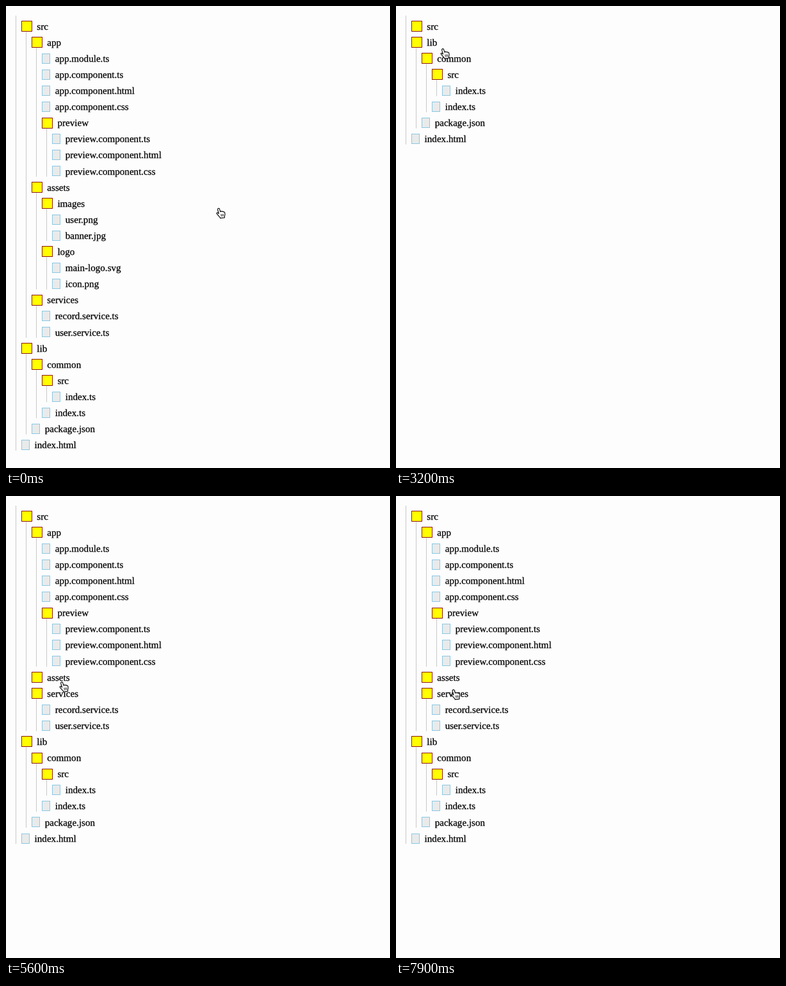
These frames come from a looping animation (600x720 px, 8000 ms). An HTML page:

```html
<!DOCTYPE html>
<html lang="en">
<head>
<meta charset="utf-8">
<title>File tree</title>
<style>
  html, body { margin: 0; width: 100%; height: 100%; overflow: hidden; background: #fefdfe; }
  svg { display: block; width: 600px; height: 720px; }
  text {
    font: 15.12px "Liberation Serif", Times, serif; text-rendering: geometricPrecision;
    stroke: #000; stroke-width: .25;
  }
  .folder { fill: #ff0; stroke: #8f1a10; }
  .file { fill: #e9eaea; stroke: #8cc8e2; }
  .guide { stroke: #c9c9c9; }
</style>
</head>
<body>
<svg viewBox="0 0 600 720">
  <g id="tree"></g>
  <g id="hand" stroke="#111" stroke-linejoin="round" stroke-linecap="round">
    <path fill="#fff" stroke-width="1.2" d="M3.5 1C5 .4 5.5 1.3 5.8 2.4L7 6.2Q8 4.5 9.5 6Q11 5 11.8 6.4Q13.4 6 13.8 7.5Q14.6 10.5 13.5 13V15.3L6.8 16.2L6.3 14.8Q3.5 12 1.2 8.8Q1 7 3 7.8L4.5 9L2.7 3Q2.4 1.5 3.5 1Z"/>
    <path fill="none" stroke-width=".8" d="M7.8 10.2l.6 3M9.6 10l.5 3M11.4 9.8l.4 3"/>
  </g>
</svg>
<script>
const LOOP = 8000, STEP = 100, ROW = 25.1, INDENT = 16.05;

const rows = `src
 app
  app.module.ts
  app.component.ts
  app.component.html
  app.component.css
  preview
   preview.component.ts
   preview.component.html
   preview.component.css
 assets
  images
   user.png
   banner.jpg
  logo
   main-logo.svg
   icon.png
 services
  record.service.ts
  user.service.ts
lib
 common
  src
   index.ts
  index.ts
 package.json
index.html`.split("\n").map(line => {
  const name = line.trim();
  return { name, depth: line.length - name.length, folder: !name.includes(".") };
});
const rowOf = name => rows.findIndex(row => row.name === name);

// each click opens or closes a folder
const clicks = [
  { at: 1700, row: rowOf("src") },
  { at: 2600, row: rowOf("lib") },
  { at: 3000, row: rowOf("lib") },
  { at: 4400, row: rowOf("src") },
  { at: 5600, row: rowOf("assets") },
  { at: 6900, row: rowOf("preview") },
  { at: 7500, row: rowOf("preview") }
];

// the pointer circles the rows on its way to the next place; swing is the size of that circle
const start = { x: 328, y: 314.5 };
const moves = [
  { from: 0, to: 1500, x: 53, y: 30, swing: [-100, 490] },
  { from: 1900, to: 2300, x: 52, y: 54, swing: [50, 145] },
  { from: 3000, to: 4200, x: 50, y: 35.5, swing: [20, 60] },
  { from: 4400, to: 5200, x: 83, y: 289, swing: [70, 60] },
  { from: 5600, to: 6700, x: 93, y: 186.5, swing: [75, -165] },
  { from: 7500, to: 7900, x: 85.5, y: 301, swing: [50, -130] }
];

const tree = document.getElementById("tree");
const hand = document.getElementById("hand");
const snap = v => Math.round(v) + 0.5;
const box = (kind, x, y, w, h) =>
  `<rect class="${kind}" x="${snap(x)}" y="${snap(y)}" width="${w}" height="${h}"/>`;
const guide = (x, y1, y2) =>
  `<line class="guide" x1="${snap(x)}" x2="${snap(x)}" y1="${y1}" y2="${y2}"/>`;

function visibleRows(closed) {
  let limit = Infinity;
  return rows.filter((row, i) => {
    if (row.depth > limit) return false;
    limit = closed.has(i) ? row.depth : Infinity;
    return true;
  });
}

function drawTree(closed) {
  const list = visibleRows(closed);
  const mid = i => 31.5 + i * ROW;
  let out = guide(15, 15, mid(list.length - 1) + 8.6);
  list.forEach(({ name, depth, folder }, i) => {
    const x = depth * INDENT, y = mid(i);
    let last = i;
    while (list[last + 1]?.depth > depth) last++;
    if (last > i) out += guide(31 + x, y + 8.6, mid(last) + 8.6);
    out += folder ? box("folder", 24 + x, y - 8.5, 16, 16) : box("file", 24 + x, y - 8, 12, 15);
    out += `<text x="${(folder ? 48.3 : 44.6) + x}" y="${y + 5.1}">${name}</text>`;
  });
  tree.innerHTML = out;
}

function closedAt(t) {
  const closed = new Set();
  for (const { at, row } of clicks) {
    if (t >= at && !closed.delete(row)) closed.add(row);
  }
  return closed;
}

function pointerAt(t) {
  let { x, y } = start;
  for (const move of moves) {
    if (t < move.from) break;
    const k = Math.min(1, (t - move.from) / (move.to - move.from));
    const [w, h] = move.swing;
    x += (move.x - x) * k + w * Math.sin(2 * Math.PI * k);
    y += (move.y - y) * k + h * Math.sin(Math.PI * k) ** 2;
  }
  return [x, y];
}

let shown;
function frame() {
  const t = Math.floor(performance.now() % LOOP / STEP) * STEP;
  const closed = closedAt(t), state = [...closed].join();
  if (shown !== state) drawTree(closed);
  shown = state;
  hand.setAttribute("transform", `translate(${pointerAt(t)})`);
  requestAnimationFrame(frame);
}
frame();
</script>
</body>
</html>
```
